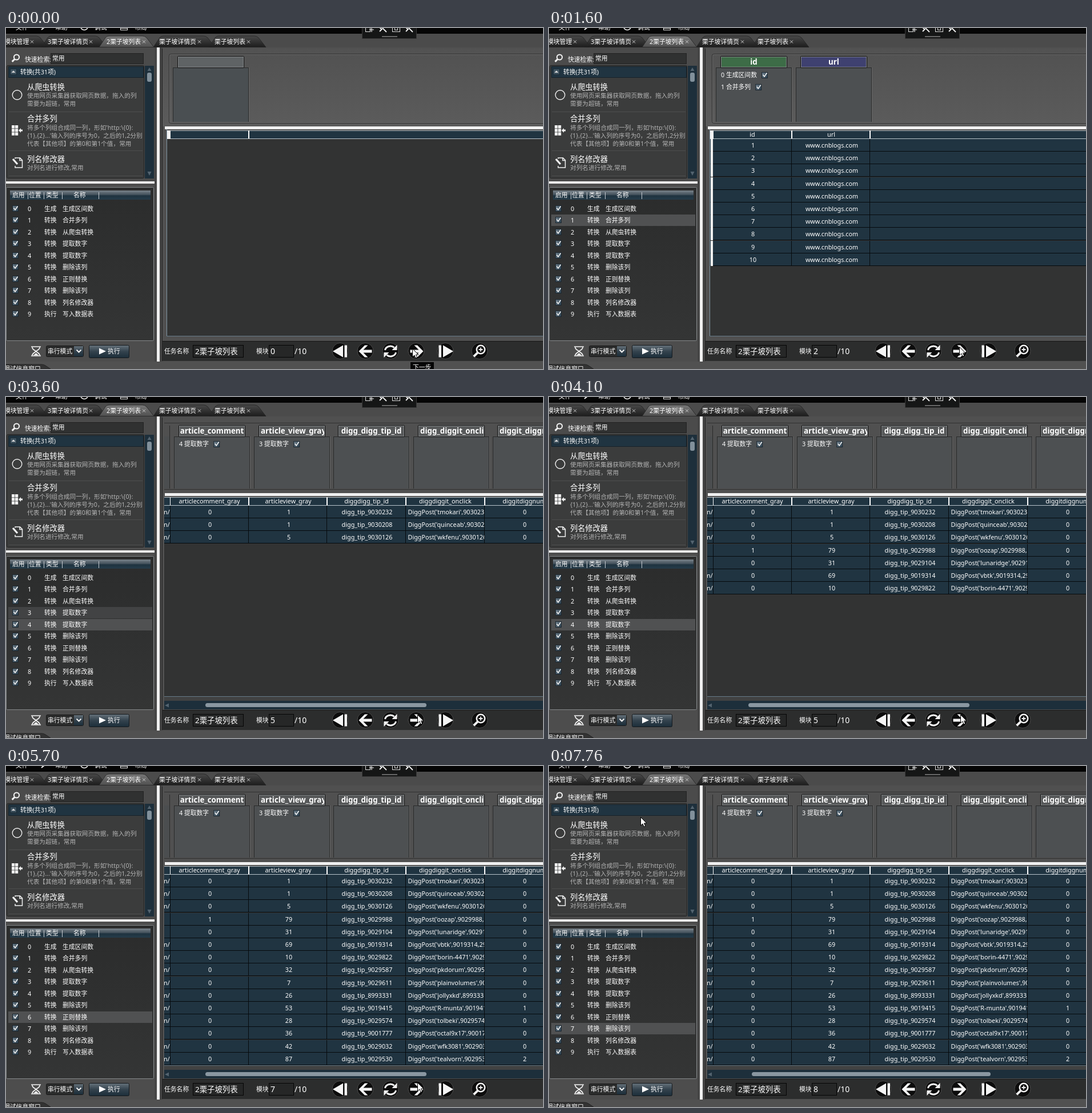
These frames come from a looping animation (940 px wide and 596 px high, 8000 ms). An HTML page:

```html
<!DOCTYPE html>
<html lang="zh-CN">
<head>
<meta charset="utf-8">
<title>列表任务</title>
<style>
html, body { margin: 0; width: 100%; height: 100%; overflow: hidden; background: #4e4e4e; }
#stage { display: block; width: 940px; height: 596px; }
text { font-family: "Noto Sans", "Noto Sans CJK SC", "Noto Sans CJK", sans-serif; font-weight: 500; white-space: pre; }
.bold { font-weight: 700; }
</style>
</head>
<body>
<svg id="stage" viewBox="0 0 940 596" xmlns="http://www.w3.org/2000/svg">
  <defs>
    <linearGradient id="tab" x2="0" y2="1"><stop stop-color="#484848"/><stop offset="1" stop-color="#1d1d1d"/></linearGradient>
    <linearGradient id="live" x2="0" y2="1"><stop stop-color="#777"/><stop offset="1" stop-color="#505050"/></linearGradient>
    <linearGradient id="head" x2="0" y2="1"><stop stop-color="#79838b"/><stop offset=".5" stop-color="#3d4c57"/><stop offset=".55" stop-color="#1e323f"/><stop offset="1" stop-color="#263c4a"/></linearGradient>
    <linearGradient id="list" x2="0" y2="1"><stop stop-color="#2b2c2c"/><stop offset="1" stop-color="#343535"/></linearGradient>
    <linearGradient id="btn" x2="0" y2="1"><stop stop-color="#65717a"/><stop offset=".5" stop-color="#33424d"/><stop offset="1" stop-color="#1c2e3a"/></linearGradient>
    <linearGradient id="box" x2="1" y2="1"><stop stop-color="#70808c"/><stop offset="1" stop-color="#2a3f4e"/></linearGradient>
    <linearGradient id="wide" x2="0" y2="1"><stop stop-color="#525252"/><stop offset="1" stop-color="#5b5b5b"/></linearGradient>
  </defs>
  <g id="base"></g>
  <g id="live-parts"></g>
  <g id="front"></g>
  <g id="pointer"><path d="M0 0V14.5L3.4 11.4L5.7 16.6L8.2 15.5L6 10.5H10.4Z" fill="#fff" stroke="#000"/></g>
</svg>
<script>
const $ = id => document.getElementById(id);
const SITE = '栗子坡';
const BLUE = '#203441';

const rect = (x, y, w, h, fill, extra = '') =>
  `<rect x="${x}" y="${y}" width="${w}" height="${h}" fill="${fill}" ${extra}/>`;
const frame = (x, y, w, h, fill, line, r = 0) =>
  rect(x + .5, y + .5, w - 1, h - 1, fill, `stroke="${line}" rx="${r}"`);
const path = (d, fill, extra = '') => `<path d="${d}" fill="${fill}" ${extra}/>`;
const stroke = (d, w, color = '#f2f2f2') => path(d, 'none', `stroke="${color}" stroke-width="${w}"`);
const esc = s => String(s).replace(/&/g, '&amp;').replace(/</g, '&lt;');
// Text placed by its vertical middle
const text = (x, mid, s, size = 10.8, fill = '#fff', extra = '') =>
  `<text x="${x}" y="${Math.round(mid + size * .37)}" font-size="${size}" fill="${fill}" ${extra}>${esc(s)}</text>`;
const centred = (x, mid, s, size, fill, extra = '') => text(x, mid, s, size, fill, 'text-anchor="middle" ' + extra);
const clip = (x, y, w, h, body) =>
  `<svg x="${x}" y="${y}" width="${w}" height="${h}" viewBox="${x} ${y} ${w} ${h}">${body}</svg>`;
const check = (x, y) => frame(x, y, 11, 11, 'url(#box)', '#1b2730') +
  stroke(`M${x + 2.5} ${y + 4.5}l2.5 3.5l4.5 -6.5`, 1.5, '#f4f4f4');
const lens = (x, y, r, w) => `<circle cx="${x}" cy="${y}" r="${r}" fill="none" stroke="#f2f2f2" stroke-width="${w}"/>` +
  stroke(`M${x - r * .7} ${y + r * .7}l${-r} ${r}`, w * 1.5);

const tasks = ['生成 生成区间数', '转换 合并多列', '转换 从爬虫转换', '转换 提取数字', '转换 提取数字',
  '转换 删除该列', '转换 正则替换', '转换 删除该列', '转换 列名修改器', '执行 写入数据表'];

const users = ['tmokari', 'quinceab', 'wkfenu', 'oozap', 'lunaridge', 'vbtk', 'borin-4471', 'pkdorum',
  'plainvolumes', 'jollyxkd', 'R-munta', 'tolbeki', 'octal9x17', 'wfk3081', 'tealvorn'];
const ids = [9030232, 9030208, 9030126, 9029988, 9029104, 9019314, 9029822, 9029587,
  9029611, 8993331, 9019415, 9029574, 9001777, 9029032, 9029530];
const views = [1, 1, 5, 79, 31, 69, 10, 32, 7, 26, 53, 28, 36, 42, 87];
const diggs = { 10: 1, 14: 2 };

function topBar() {
  let s = rect(0, 0, 940, 10, '#050505') + rect(0, 10, 940, 24, '#4b4b4b');
  [[17, '文件'], [86, '帮助'], [155, '调试'], [225, '布局']].forEach(([x, w]) => s += text(x, -1, w));
  s += stroke('M62 3l5 -4', 2) + '<circle cx="137" cy="-3" r="6.5" fill="none" stroke="#eee" stroke-width="1.5"/>' +
    frame(200, -6, 13, 10, 'none', '#eee') + rect(200, 0, 13, 1, '#eee');
  const tabs = [[355, 455, 365, SITE + '列表', 424], [258, 366, 268, SITE + '详情页', 338],
    [62, 176, 73, '3' + SITE + '详情页', 148], [-30, 73, -3, '模块管理', 45], [163, 259, 176, '2' + SITE + '列表', 241]];
  tabs.forEach(([l, r, x, name, cross], i) => {
    s += path(`M${l} 33.5L${l + 11} 17Q${l + 13} 14 ${l + 17} 14H${r - 20}Q${r - 16} 14 ${r - 13} 17L${r} 33.5Z`,
      `url(#${i == 4 ? 'live' : 'tab'})`, 'stroke="#222" stroke-width=".8"');
    s += text(x, 24, name) + stroke(`M${cross - 2} 21.5l5 5m0 -5l-5 5`, 1, '#ccc');
  });
  return s;
}

function searchPanel() {
  let s = rect(0, 34, 260, 234, '#4b4b4b') + lens(18.5, 51, 4.6, 2) + text(33, 55, '快速检索:') +
    frame(78, 44, 163, 19, '#303131', '#222') + text(81, 53, '常用');
  s += frame(1, 65, 241, 198, '#3b3c3c', '#222', 2) + frame(4, 67, 237, 20, BLUE, '#15222b') +
    frame(7, 71, 12, 11, '#40535f', '#1a2a35') + path('M9.5 78l3.5 -3.5l3.5 3.5Z', '#ddd') +
    text(25, 77, '转换(共31项)');
  [146, 214, 258].forEach(y => s += rect(5, y, 234, 1, '#4d4e4e'));
  [[103, '从爬虫转换'], [158.5, '合并多列'], [229, '列名修改器']].forEach(([y, w]) => s += text(37, y, w, 13.2));
  [[118, '使用网页采集器获取网页数据，拖入的列'], [132, '需要为超链，常用'],
    [174, "将多个列组合成同一列，形如'http:\\{0}:"], [188, "{1},{2}...'输入列的序号为0，之后的1,2分别"],
    [202, '代表【其他项】的第0和第1个值，常用'], [244, '对列名进行修改,常用']]
    .forEach(([y, w]) => s += text(37, y, w, 10.65, '#b4b4b4'));
  s += '<circle cx="19.5" cy="117" r="8.3" fill="none" stroke="#eee" stroke-width="1.4"/>';
  for (let i = 0; i < 6; i++) s += rect(10 + i % 2 * 6, 170 + (i >> 1) * 6.2, 5.2, 5.4, '#f2f2f2');
  s += path('M22 179l4 -4v2.6h3v2.8h-3v2.6Z', '#f2f2f2');
  s += stroke('M16 228.5V227h8.5l4 4v13H16v-3M24 227v4.5h4.5', 1.5) + stroke('M12 229l8 9', 3.2);
  s += rect(243, 66, 16, 197, '#1d2f3b') + rect(247, 78, 8, 16, '#81909b', 'rx="3"') +
    path('M247.5 75l3.5 -6l3.5 6Z', '#53636f') + path('M247.5 251l3.5 7l3.5 -7Z', '#53636f');
  return s + rect(0, 268, 260, 4, '#f0f0f0');
}

function taskPanel() {
  let s = rect(0, 272, 260, 311, '#4d4d4d') + frame(0, 278, 259, 269, 'url(#list)', '#85898b', 2) + rect(7, 284, 246, 16, 'url(#head)');
  [[11, '启用'], [40, '位置'], [70, '类型'], [118, '名称']].forEach(([x, w]) => s += text(x, 292.5, w));
  [38, 66, 98, 162].forEach(x => s += rect(x, 287, 1, 12, '#c5cbd0'));
  s += stroke('M44 557h17M44 573h17M46 558c0 5 6 5 6 7s-6 3 -6 7M59 558c0 5 -6 5 -6 7s6 3 6 7', 1.7) + path('M48 572l4.5 -4l4.5 4Z', '#eee');
  s += frame(70, 555, 66, 20, '#2b2c2c', '#171717', 2) + rect(119, 556, 16, 18, 'url(#btn)') + stroke('M123.5 562.5l4 4l4 -4', 2) +
    text(73, 565, '串行模式');
  return s + frame(145, 554, 71, 23, 'url(#btn)', '#14191d', 2) + path('M163 559.5v11l12 -5.5Z', '#fff') + text(178, 565.5, '执行');
}

function controls() {
  let s = rect(274, 548, 666, 34, '#2c2d2d') + rect(274, 547, 666, 1, '#161616') + text(277, 565, '任务名称') +
    frame(327, 554, 89, 22, '#262727', '#050505') + text(331, 565, '2' + SITE + '列表', 13.4) + text(438, 565, '模块') +
    frame(460, 554, 44, 22, '#262727', '#050505') + text(505, 565, '/10', 14);
  [585, 629, 673, 718, 769, 829].forEach(x =>
    s += `<circle cx="${x}" cy="564.5" r="14" fill="#0c0c0c" stroke="#4a4a4a"/>`);
  const w = '#f4f4f4';
  s += path('M572 565l18 -10.5v21ZM592.5 554.5h4.5v21h-4.5Z', w) + path('M783 565l-18 -10.5v21ZM757.5 554.5h4.5v21h-4.5Z', w);
  const arrow = 'M0 0l10.5 -10.5h5.5l-8 8h15v5h-15l8 8h-5.5Z';
  s += `<g fill="${w}"><path d="${arrow}" transform="translate(617.5 565)"/><path d="${arrow}" transform="translate(730.5 565) scale(-1 1)"/></g>`;
  s += stroke('M663.5 563a9.5 8.5 0 0 1 16 -4.5M682.5 567a9.5 8.5 0 0 1 -16 4.5', 3) +
    path('M684.5 554v9h-9ZM661.5 576v-9h9Z', w);
  return s + lens(831, 562, 7.2, 2.6) + stroke('M827.5 562h7M831 558.5v7', 1.8);
}

function drawBase() {
  return rect(0, 0, 940, 596, '#505050') + topBar() + rect(274, 34, 666, 514, '#505050') + searchPanel() + taskPanel() +
    rect(260, 34, 14, 549, '#454545') + rect(264, 34, 5, 549, '#f0f0f0') + rect(273, 36, 1, 546, '#222') + controls() +
    rect(0, 583, 940, 13, '#515151') + path('M-5 596V588H62Q66 588 69 590L78 596Z', '#333', 'stroke="#222"') + text(-4, 596, '调试信息窗口');
}

function drawFront() {
  const hand = x => stroke(`M${x} -1l3 3l3 -1l6 6M${x} 6l4 -4`, 1.8);
  return frame(623, -2, 96, 21, '#151616', '#3a3a3a') + rect(658, 14, 27, 2, '#666') +
    frame(629, -2, 9, 9, 'none', '#ddd') + stroke('M640 -1v8M636 3h8', 1.2) + hand(654) +
    frame(676, -4, 14, 11, 'none', '#ddd') + frame(680, -1, 6, 5, 'none', '#ddd') + hand(700);
}

function card(x, end, label, color, items = []) {
  let s = rect(x - 7, 69, 131, end - 69, color ? '#4d5052' : '#4a4f52') + rect(x - 8, 69, 1, end - 69, '#292a2a') +
    rect(x + 124, 69, 1, end - 69, '#292a2a') + rect(x - 7, 69, 131, 1, '#2a2b2b') + rect(x + 125, 69, 1, end - 69, '#686868');
  s += frame(x, 49, 117, 21, color || '#5f6365', '#0b0b0b', 1) + frame(x + 1, 50, 115, 19, 'none', '#85888a');
  const bold = 'class="bold"';
  s += clip(x + 1, 49, 114, 21, label.length > 16 ? text(x + 4, 59, label, 13.3, '#fff', bold) : centred(x + 58.5, 59, label, 13.3, '#fff', bold));
  items.forEach((w, i) => s += text(x + 1, 82 + 21 * i, w) + check(x + 18 + 10.8 * (w.length - 2), 77 + 21 * i));
  return s;
}

// Table with a header and n rows; each column is [title, row => value, align left]
function table(top, bottom, n, cols, lead) {
  const at = i => Math.floor(287.3 + 137.75 * i), left = lead ? 277 : 282, wide = 940 - left;
  let s = rect(left, top, wide, bottom - top, '#323333') + rect(left, top, wide, 15, BLUE) +
    rect(left, top, wide, 1, '#aeb8be') + rect(left, top + 14, wide, 1, '#b8c3ca');
  if (!lead) s += rect(282, top, 6, 15, '#f4f4f4');
  let body = '';
  for (let r = 0; r < n; r++) {
    const y = Math.round(top + 15 + 22.2 * r), mid = top + 26 + 22.2 * r;
    body += rect(left, y, wide, 22, BLUE) + rect(left, y + 21, wide, 1, '#060a0d');
    if (lead && ![3, 4, 12].includes(r)) body += clip(277, y, 10, 21, text(276, mid, 'n/'));
    cols.forEach(([, get, flush], i) => {
      const x = at(i);
      body += rect(at(i + 1) - 1, y, 1, 22, '#060a0d') +
        clip(x, y, 137, 21, flush ? text(x + 3.5, mid, get(r)) : centred(x + 70, mid, get(r)));
    });
    body += lead ? rect(287, y, 1, 22, '#060a0d') : rect(283, y, 4, 22, '#f0f0f0');
  }
  s += clip(left, top + 15, wide, bottom - top - 15, body);
  if (lead) s += rect(287, top, 1, 14, '#fff');
  cols.forEach(([name], i) => s += rect(at(i + 1) - 1, top, 2, 14, '#fff') +
    clip(at(i) + 1, top, 136, 15, centred(at(i) + 69, top + 7, name)));
  return s;
}

function narrow(s) {
  const lit = s.lit, id = s.named ? 'id' : '', cols = [[id, r => r + 1]];
  let out = rect(274, 36, 666, 136, 'url(#wide)') + frame(285, 45, 670, 122, 'url(#wide)', '#303030', 3) + frame(286, 46, 670, 120, 'none', '#6a6a6a', 3) +
    card(300, 164, id, lit && '#3d6c47', s.items);
  if (s.url) {
    out += card(440, 164, 'url', lit && '#3f4170');
    cols.push(['url', () => lit ? 'www.cnblogs.com' : '']);
  }
  return out + rect(278, 172, 662, 5, '#f0f0f0') + rect(281, 177, 1, 362, '#8196a3') + table(179, 538, s.n, cols, false) +
    rect(281, 538, 659, 1, '#667b89');
}

function broad(s) {
  const names = ['article_comment', 'article_view_gray', 'digg_digg_tip_id', 'digg_diggit_onclick', 'diggit_diggnum_num'];
  const items = [s.got > 1 ? ['4 提取数字'] : [], s.got > 0 ? ['3 提取数字'] : []];
  let out = rect(274, 36, 666, 132, '#505050') + rect(277, 45, 663, 1, '#303030') + rect(277, 161, 663, 1, '#303030') +
    rect(277, 69, 9, 91, '#4b4e50') + rect(286, 50, 1, 110, '#292a2a');
  names.forEach((w, i) => out += card(Math.round(302 + 139.6 * i), 160, w, '#57595a', items[i]));
  const cols = [
    ['articlecomment_gray', r => s.got > 1 ? +(r == 3) : `评论(${+(r == 3)})`],
    ['articleview_gray', r => s.got > 0 ? views[r] : `阅读(${views[r]})`],
    ['diggdigg_tip_id', r => 'digg_tip_' + ids[r]],
    ['diggdiggit_onclick', r => `DiggPost('${users[r]}',${ids[r]},${r == 3 ? 31 : 29})`, true],
    ['diggitdiggnum', r => diggs[r] || 0]];
  const [a, b] = s.late ? [355, 773] : [349, 736];
  return out + rect(278, 168, 662, 5, '#f0f0f0') + table(175, 523, s.n, cols, true) + rect(277, 523, 663, 1, '#667b89') +
    rect(277, 524, 663, 7, '#414242') + rect(277, 531, 663, 15, '#1d2f3b') + rect(a, 535, b - a, 7, '#8a97a1', 'rx="3.5"') +
    path('M285 535.5v7l-7 -3.5Z', '#53636f');
}

function taskRows(s) {
  const mid = i => 316 + 20.45 * i;
  const band = (i, c) => i == null ? '' : rect(4, Math.round(mid(i) - 10), 252, 20, c);
  let out = band(s.prev, '#424344') + band(s.hl, '#505152');
  tasks.forEach((w, i) => {
    const [kind, name] = w.split(' '), y = mid(i);
    out += check(11, Math.round(y - 6)) + text(38, y, i) + text(67, y, kind) + text(99, y, name);
  });
  return out;
}

function draw(s) {
  let out = (s.broad ? broad(s) : narrow(s)) + taskRows(s) + text(463, 565, s.mod, 14);
  if (s.tip) out += frame(707, 583, 43, 16, '#050505', '#555') + text(712, 593, '下一步');
  return out;
}

// Each entry holds only what changes at its time
const changes = [
  { t: 0, mod: 0, n: 0, tip: 1, at: [711, 560] },
  { t: 280, mod: 1, tip: 0, at: [714, 559] },
  { t: 530, named: 1, n: 10, at: [717, 558] },
  { t: 780, items: ['0 生成区间数'] },
  { t: 1060, mod: 2, url: 1 },
  { t: 1330, lit: 1, hl: 1, items: ['0 生成区间数', '1 合并多列'] },
  { t: 1600, at: [718, 557] },
  { t: 2100, mod: 3, broad: 1, got: 0, hl: 2, prev: 1, n: 3 },
  { t: 2350, n: 8, prev: null },
  { t: 2600, n: 13 },
  { t: 2850, n: 15 },
  { t: 3100, mod: 4, got: 1, hl: 3, prev: 2, n: 4, at: [719, 556] },
  { t: 3350, n: 11, prev: null },
  { t: 3600, mod: 5, got: 2, hl: 4, prev: 3, n: 3, at: [720, 555] },
  { t: 3850, n: 5, prev: null },
  { t: 4100, n: 7 },
  { t: 4350, n: 9 },
  { t: 4630, mod: 6, hl: 5, prev: 4, n: 13 },
  { t: 4880, n: 15, prev: null },
  { t: 5160, at: [720, 553] },
  { t: 5430, mod: 7, hl: 6, prev: 5, n: 5 },
  { t: 5700, n: 15, prev: null },
  { t: 5950, mod: 8, hl: 7, prev: 6, n: 6, late: 1, at: [721, 552] },
  { t: 6200, n: 15 },
  { t: 6450, prev: null },
  { t: 6700, at: [621, 464] },
  { t: 6980, at: [522, 378] },
  { t: 7230, at: [417, 284] },
  { t: 7510, at: [262, 168] },
  { t: 7760, at: [160, 89] }
];
const states = [];
changes.forEach((c, i) => states.push({ ...states[i - 1], ...c }));

$('base').innerHTML = drawBase();
$('front').innerHTML = drawFront();

let shown = null;
function tick(now) {
  const t = now % 8000;
  const s = states.filter(c => c.t <= t).pop();
  if (s !== shown) {
    shown = s;
    $('live-parts').innerHTML = draw(s);
    $('pointer').setAttribute('transform', `translate(${s.at[0] + .5} ${s.at[1] + .5})`);
  }
  requestAnimationFrame(tick);
}
tick(performance.now());
</script>
</body>
</html>
```
